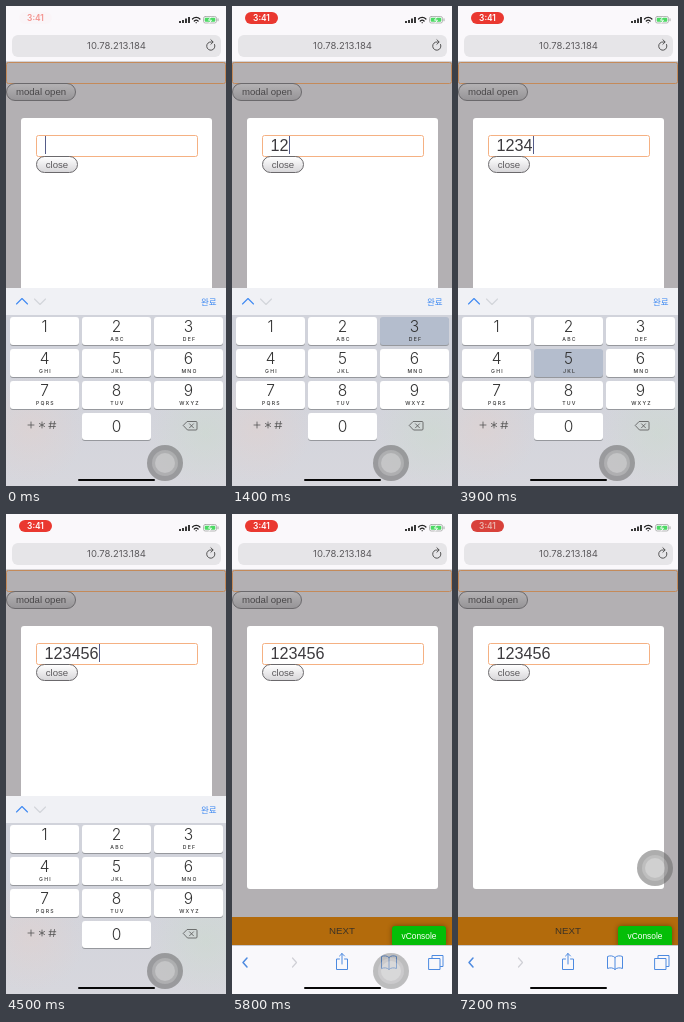
Animation, 220 px wide and 480 px high, one loop 7.3 s. Source, as an HTML page:

```html
<!DOCTYPE html>
<html lang="ko">
<head>
<meta charset="utf-8">
<title>Modal input</title>
<style>
  :root { --loop: 7300ms; --blue: #3f8af2; }
  * { box-sizing: border-box; }
  html, body { margin: 0; width: 100%; height: 100%; overflow: hidden; }
  body {
    position: relative;
    background: #b3b0b3;
    font: 9.7px/1 "Liberation Sans", Arial, sans-serif;
    color: #484648;
  }
  .abs, svg { position: absolute; }
  .mid { display: flex; align-items: center; justify-content: center; }
  svg { left: 0; top: 0; fill: none; stroke-linecap: round; stroke-linejoin: round; }

  /* browser chrome */
  .head { left: 0; top: 0; width: 220px; height: 56px; background: #faf8fb; border-bottom: 1px solid #d4d2d5; }
  .pill {
    left: 13px; top: 6px; width: 33px; height: 12px; border-radius: 6px;
    font: 600 8.4px/1 Inter, sans-serif;
    animation: pill var(--loop) linear infinite;
  }
  .url {
    left: 6px; top: 29px; width: 209px; height: 22px; border-radius: 6px;
    background: #e6e5e8; color: #5c5a5d; font: 9.5px/1 Inter, sans-serif;
  }
  .tools { left: 0; top: 431px; width: 220px; height: 49px; background: #f9f8fb; border-top: 1px solid #c9c7cb; }
  .home { left: 72px; top: 473px; width: 77px; height: 2px; border-radius: 1px; background: #080808; }

  /* page */
  .field { border: 1px solid #f5b183; border-radius: 2.5px; }
  .back { left: 0; top: 56px; width: 220px; height: 22px; border-color: #c48a5a; }
  .btn { height: 18px; border: 1px solid #6b696c; border-radius: 9px; font-size: 9.6px; }
  .open { left: 0; top: 77px; width: 70px; background: linear-gradient(#b4b2b4, #969497); }
  .modal { left: 15px; top: 112px; width: 191px; height: 263px; border-radius: 3px; background: #fff; }
  .modal .field { left: 15px; top: 17px; width: 162px; height: 22px; }
  .close { left: 15px; top: 38px; width: 42px; height: 17px; background: linear-gradient(#fff, #d8d7da); color: #5a585b; }
  .typed {
    left: 7.5px; top: 0; height: 18px; overflow: hidden; box-sizing: content-box;
    font-size: 16.2px; line-height: 18px; color: #3c3a3e; white-space: nowrap;
    border-right: 1.2px solid #555c88;
    animation: type var(--loop) step-end infinite, blink var(--loop) step-end infinite;
  }
  .next { left: 0; top: 403px; width: 220px; height: 28px; background: #b36b0c; color: #3c3226; }
  .console {
    left: 160px; top: 412px; width: 54px; height: 21px; border-radius: 3px;
    background: #04be08; color: #fff; font-size: 8.4px; box-shadow: 0 0 5px #0006;
  }

  /* keyboard */
  .kb {
    left: 0; top: 282px; width: 220px; height: 198px;
    background:
      radial-gradient(circle at 25px 140px, #e6cfc866, #e6cfc800 55px),
      radial-gradient(circle at 200px 145px, #c8dcc866, #c8dcc800 55px),
      linear-gradient(#d1d3db 40%, #d7d7dd);
    animation: slide var(--loop) linear infinite;
  }
  .bar { left: 0; top: 0; width: 220px; height: 27px; background: #f0f1f5; }
  .done { left: 195px; top: 9px; color: var(--blue); font: 8.5px/1 "Noto Sans CJK KR", "Noto Sans CJK", sans-serif; }
  .keys { left: 4px; top: 29.3px; display: grid; grid: repeat(4, 27.5px) / repeat(3, 69px); gap: 4.4px 3px; }
  .keys b {
    position: relative; border-radius: 3px; background: #fff; box-shadow: 0 1px #96989d;
    font: 300 15.5px/20px Inter, sans-serif; color: #333; text-align: center;
    animation: press var(--loop) step-end var(--at, 99999s) infinite;
  }
  .keys i {
    position: absolute; left: 1px; top: 18.5px; width: 100%;
    font: 500 5.2px/6px Inter, sans-serif; letter-spacing: 1.2px;
  }
  .keys .zero { line-height: 27px; grid-column: 2; }

  .ball {
    left: 141px; top: 439px; width: 36px; height: 36px; border-radius: 50%;
    background: #6668;
    animation: ball var(--loop) ease-in-out infinite;
  }
  .ball::before, .ball::after { content: ""; position: absolute; border-radius: 50%; background: #fff3; }
  .ball::before { inset: 5px; }
  .ball::after { inset: 8px; background: #fff4; }

  @keyframes pill {
    0% { background: #ea383000; color: #f3928c; }
    1%, 96% { background: #ea3830; color: #fff; }
    98.6%, 100% { background: #d8423b; color: #eab4ac; }
  }
  @keyframes type {
    0% { width: 0; }
    8.2% { width: 1ch; }
    14.4% { width: 2ch; }
    19.9% { width: 3ch; }
    47.3% { width: 4ch; }
    54.1% { width: 5ch; }
    61%, 100% { width: 6ch; }
  }
  @keyframes blink {
    0%, 34%, 47.3% { border-color: #555c88; }
    27.4%, 40.4%, 69.2%, 100% { border-color: transparent; }
  }
  @keyframes press {
    0% { background: #b4bdcd; }
    2%, 100% { background: #fff; }
  }
  @keyframes slide {
    0%, 70.5% { transform: none; }
    71.25% { transform: translateY(20px); animation-timing-function: ease-out; }
    76.5%, 100% { transform: translateY(200px); }
  }
  @keyframes ball {
    0%, 74% { transform: none; opacity: 1; }
    77%, 80.8% { transform: none; opacity: .75; }
    86.3%, 100% { transform: translate(38px, -103px); opacity: 1; }
  }
</style>
</head>
<body>
  <div class="abs field back"></div>
  <div class="abs btn mid open">modal open</div>
  <div class="abs mid next">NEXT</div>
  <div class="abs mid console">vConsole</div>

  <div class="abs modal">
    <div class="abs field"><div class="abs typed">123456</div></div>
    <div class="abs btn mid close">close</div>
  </div>

  <div class="abs head">
    <div class="abs mid pill">3:41</div>
    <div class="abs mid url">10.78.213.184</div>
    <svg width="220" height="56">
      <path d="M174 17v-2M177 17v-3M180 17v-4.5M183 17v-6" stroke="#222" stroke-width="1.8" stroke-linecap="butt"/>
      <path d="M186.5 13a5.2 5.2 0 0 1 7.4 0M188.3 15a2.8 2.8 0 0 1 3.8 0M190.2 16.6v.1" stroke="#222" stroke-width="1.3"/>
      <rect x="197.5" y="10.5" width="13" height="6.5" rx="1.8" stroke="#a5a8a5" stroke-width=".8"/>
      <rect x="198.7" y="11.7" width="10.6" height="4.1" rx="1" fill="#4cd964"/>
      <path d="M204.800 11.200l-2.300 3h3l-2.300 3" stroke="#fff" stroke-width=".9"/>
      <path d="M212 12.800v2" stroke="#a5a8a5"/>
      <path d="M208.600 38.500a4.100 4.100 0 1 1-3.400-2.500h1.500M204.900 33.800l2.300 2.200-2.300 2.200" stroke="#444" stroke-width=".9"/>
    </svg>
  </div>

  <div class="abs tools">
    <svg width="220" height="40" stroke="#4d8ae0" stroke-width="1">
      <path d="M15 12l-4 4.500 4 4.500" stroke-width="1.500"/>
      <path d="M60.500 12l4 4.500-4 4.500" stroke="#d0d0d6" stroke-width="1.200"/>
      <path d="M107.500 13h-3v10.500h11V13h-3M110 18V7.500M107.500 10l2.500-2.500 2.500 2.500"/>
      <path d="M157 11.500c-2-2-5-2-7.500-1v12c2.500-1 5.500-1 7.500 1 2-2 5-2 7.500-1v-12c-2.500-1-5.500-1-7.500 1v12"/>
      <path d="M200 12V9.500h11v11h-2.500M197 12.500h11v11h-11z"/>
    </svg>
  </div>

  <div class="abs kb">
    <div class="abs bar"></div>
    <div class="abs done">완료</div>
    <svg width="220" height="198">
      <path d="M10.500 16l5.500-5.500 5.500 5.500" stroke="#3f8af2" stroke-width="1.100"/>
      <path d="M28.500 11l5.500 5.500 5.500-5.500" stroke="#d2d5da" stroke-width="1.100"/>
      <path d="M22 137h6M25 134v6M36 134v6M33.400 135.500l5.200 3M38.600 135.500l-5.200 3M45 133.500l-1 7M48.500 133.500l-1 7M43.200 135.700h6.600M42.800 138.500h6.600" stroke="#555" stroke-width=".8"/>
      <path d="M181.500 133.500h8.500q1 0 1 1v6.500q0 1-1 1h-8.500l-4-4.250zM183.500 135.800l4 4M187.500 135.800l-4 4" stroke="#555" stroke-width=".8"/>
    </svg>
    <div class="abs keys">
      <b style="--at:.5s">1</b>
      <b style="--at:.95s">2<i>ABC</i></b>
      <b style="--at:1.35s">3<i>DEF</i></b>
      <b style="--at:3.35s">4<i>GHI</i></b>
      <b style="--at:3.85s">5<i>JKL</i></b>
      <b style="--at:4.35s">6<i>MNO</i></b>
      <b>7<i>PQRS</i></b>
      <b>8<i>TUV</i></b>
      <b>9<i>WXYZ</i></b>
      <b class="zero">0</b>
    </div>
  </div>

  <div class="abs home"></div>
  <div class="abs ball"></div>
</body>
</html>
```
